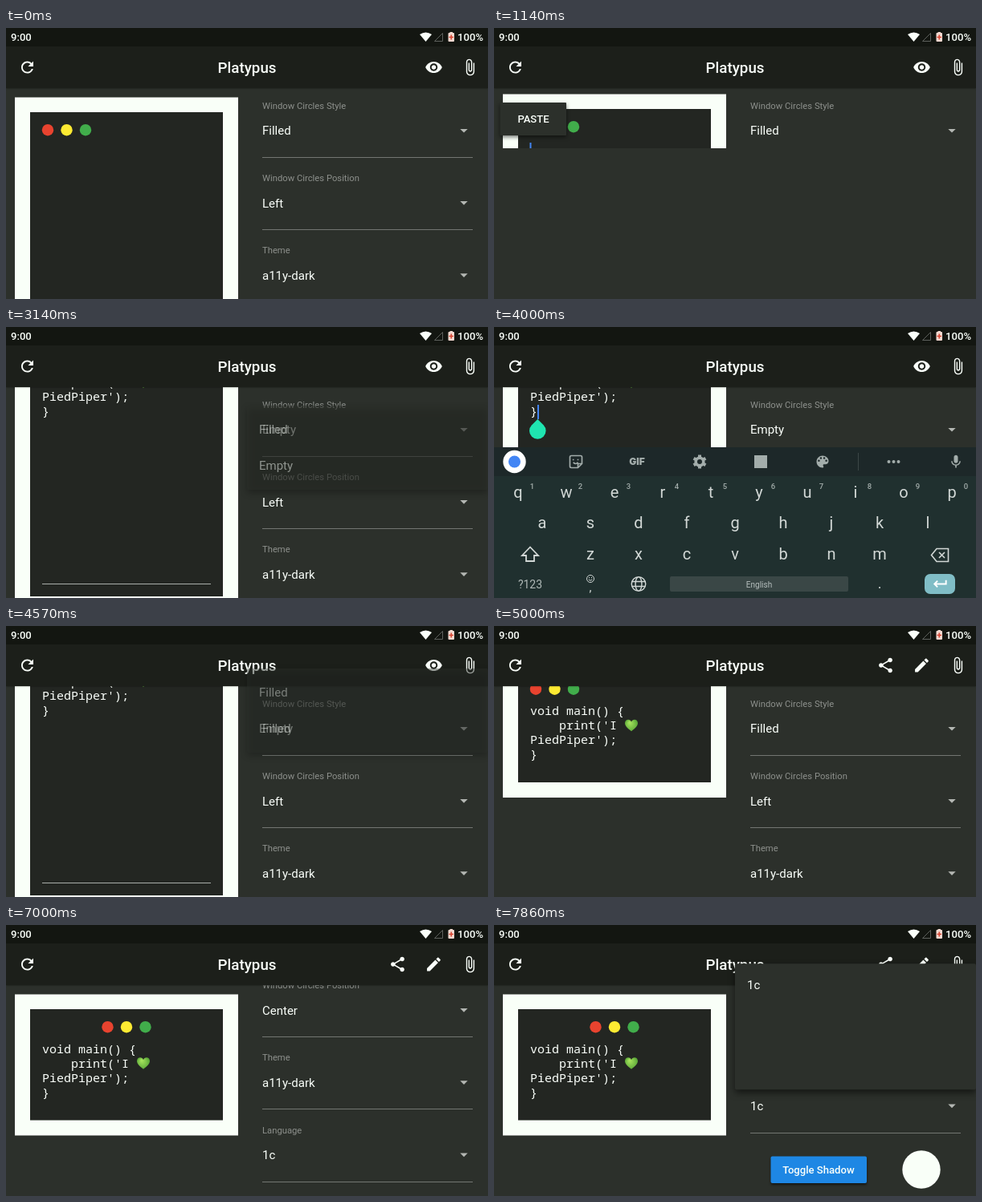
Recreate the animation shown at these times as an HTML page with a canvas. Size 600 by 338 pixels, loop 8000 ms.

```html
<!DOCTYPE html>
<html lang="en">
<head>
<meta charset="utf-8">
<title>Code snippet editor</title>
<style>
html, body { margin: 0; width: 100%; height: 100%; overflow: hidden; background: #2c302b; }
canvas { display: block; width: 600px; height: 338px; }
</style>
</head>
<body>
<canvas id="stage" width="600" height="338"></canvas>
<script>
const c = document.getElementById('stage').getContext('2d');
const LOOP = 8000, FPS = 7;
const BODY = '#2c302b', BAR = '#1c1f1a', WINDOW = '#232622', PAPER = '#f9fff8', TEXT = '#fafffa';
const ROBOTO = 'Roboto, sans-serif', MONO = '"Noto Sans Mono", "DejaVu Sans Mono", monospace';

// 24-unit icon outlines
const ICON = {
  refresh: 'M17.65 6.35C16.2 4.9 14.21 4 12 4c-4.42 0-7.99 3.58-7.99 8s3.57 8 7.99 8c3.73 0 6.84-2.55 7.73-6h-2.08c-.82 2.33-3.04 4-5.65 4-3.31 0-6-2.69-6-6s2.69-6 6-6c1.66 0 3.14.69 4.22 1.78L13 11h7V4z',
  eye: 'M12 4.5C7 4.5 2.73 7.61 1 12c1.73 4.39 6 7.5 11 7.5s9.27-3.11 11-7.5c-1.73-4.39-6-7.5-11-7.5zM12 17c-2.76 0-5-2.24-5-5s2.24-5 5-5 5 2.24 5 5-2.24 5-5 5zm0-8c-1.66 0-3 1.34-3 3s1.34 3 3 3 3-1.34 3-3-1.34-3-3-3z',
  clip: 'M16.5 6v11.5c0 2.21-1.79 4-4 4s-4-1.79-4-4V5c0-1.38 1.12-2.5 2.5-2.5s2.5 1.12 2.5 2.5v10.5c0 .55-.45 1-1 1s-1-.45-1-1V6H10v9.5c0 1.38 1.12 2.5 2.5 2.5s2.5-1.12 2.5-2.5V5c0-2.21-1.79-4-4-4S7 2.79 7 5v12.5c0 3.04 2.46 5.5 5.5 5.5s5.5-2.46 5.5-5.5V6z',
  share: 'M18 16.08c-.76 0-1.44.3-1.96.77L8.91 12.7c.05-.23.09-.46.09-.7s-.04-.47-.09-.7l7.05-4.11c.54.5 1.25.81 2.04.81 1.66 0 3-1.34 3-3s-1.34-3-3-3-3 1.34-3 3c0 .24.04.47.09.7L8.04 9.81C7.5 9.31 6.79 9 6 9c-1.66 0-3 1.34-3 3s1.34 3 3 3c.79 0 1.5-.31 2.04-.81l7.12 4.16c-.05.21-.08.43-.08.65 0 1.61 1.31 2.92 2.92 2.92s2.92-1.31 2.92-2.92-1.31-2.92-2.92-2.92z',
  edit: 'M3 17.25V21h3.75L17.81 9.94l-3.75-3.75zM20.71 7.04c.39-.39.39-1.02 0-1.41l-2.34-2.34c-.39-.39-1.02-.39-1.41 0l-1.83 1.83 3.75 3.75z',
  arrow: 'M6.4 9.5l5.6 5.6 5.6-5.6z',
  mic: 'M12 14c1.66 0 3-1.34 3-3V5c0-1.66-1.34-3-3-3S9 3.34 9 5v6c0 1.66 1.34 3 3 3zm5.3-3c0 3-2.54 5.1-5.3 5.1S6.7 14 6.7 11H5c0 3.41 2.72 6.23 6 6.72V21h2v-3.28c3.28-.48 6-3.3 6-6.72z',
  palette: 'M12 3c-4.97 0-9 4.03-9 9s4.03 9 9 9c.83 0 1.5-.67 1.5-1.5 0-.39-.15-.74-.39-1.01-.23-.26-.38-.61-.38-.99 0-.83.67-1.5 1.5-1.5H16c2.76 0 5-2.24 5-5 0-4.42-4.03-8-9-8zM6.5 12a1.5 1.5 0 1 1 0-3 1.5 1.5 0 0 1 0 3zm3-4a1.5 1.5 0 1 1 0-3 1.5 1.5 0 0 1 0 3zm5 0a1.5 1.5 0 1 1 0-3 1.5 1.5 0 0 1 0 3zm3 4a1.5 1.5 0 1 1 0-3 1.5 1.5 0 0 1 0 3z',
  shift: 'M12 2.5L2 13h5v7h10v-7h5z',
  erase: 'M8 4H22.5V20H8L1.5 12zM11 8.5l7 7M18 8.5l-7 7',
  enter: 'M20 7v5H5M9 8l-4 4 4 4',
  globe: 'M2 12a10 10 0 1 0 20 0 10 10 0 1 0-20 0zM7.5 12a4.5 10 0 1 0 9 0 4.5 10 0 1 0-9 0zM3 8.5h18M3 15.5h18',
  sticker: 'M5 3h14a2 2 0 0 1 2 2v10l-6 6H5a2 2 0 0 1-2-2V5a2 2 0 0 1 2-2zM15 21v-6h6M8 8v2M15 8v2M8 13q4 4 7 0',
  smile: 'M3 12a9 9 0 1 0 18 0 9 9 0 1 0-18 0zM9 8v2.5M15 8v2.5M7.5 14q4.5 5 9 0',
  heart: 'M12 22C5 17 1 13 1 8c0-7 9-8 11-2 2-6 11-5 11 2 0 5-4 9-11 14z',
  drop: 'M12 0L20.500 8.500A12 12 0 1 1 3.500 8.500z'
};
for (const name in ICON) ICON[name] = new Path2D(ICON[name]);

const clamp = v => Math.max(0, Math.min(1, v));

// Latest value whose step has been reached
const at = (n, ...steps) => steps.reduce((v, [from, to]) => n >= from ? to : v, 0);

function rect(x, y, w, h, fill) {
  c.fillStyle = fill;
  c.fillRect(x, y, w, h);
}

function round(x, y, w, h, r, fill) {
  c.fillStyle = fill;
  c.beginPath();
  c.roundRect(x, y, w, h, r);
  c.fill();
}

function disc(x, y, r, fill) {
  c.fillStyle = fill;
  c.beginPath();
  c.arc(x, y, r, 0, 7);
  c.fill();
}

function text(s, x, y, size, fill = TEXT, align = 'left', weight = 400, family = ROBOTO) {
  c.font = `${weight} ${size}px ${family}`;
  c.textAlign = align;
  c.fillStyle = fill;
  c.fillText(s, x, y);
}

function icon(name, x, y, size, color = TEXT, line = 0) {
  c.save();
  c.translate(x - size / 2, y - size / 2);
  c.scale(size / 24, size / 24);
  c.fillStyle = c.strokeStyle = color;
  c.lineWidth = line;
  if (line) c.stroke(ICON[name]); else c.fill(ICON[name], 'evenodd');
  c.restore();
}

function shadow(blur, y, draw) {
  c.save();
  c.shadowColor = 'rgba(0,0,0,.55)';
  c.shadowBlur = blur;
  c.shadowOffsetY = y;
  draw();
  c.restore();
}

function clipped(top, bottom, draw) {
  c.save();
  c.beginPath();
  c.rect(0, top, 600, bottom - top);
  c.clip();
  draw();
  c.restore();
}

function header(preview) {
  shadow(2, 0, () => rect(0, 0, 600, 75, BAR));
  rect(0, 0, 600, 23, '#131611');
  text('9:00', 6, 16, 13.1, TEXT, 'left', 500);
  text('100%', 594, 16, 13.1, TEXT, 'right', 500);
  c.fillStyle = TEXT;
  c.beginPath();
  c.moveTo(522.5, 17);
  c.lineTo(515, 8);
  c.quadraticCurveTo(522.5, 3, 530, 8);
  c.fill();
  c.strokeStyle = '#5d605c';
  c.lineWidth = 1;
  c.beginPath();
  c.moveTo(533.5, 16.5);
  c.lineTo(543.5, 16.5);
  c.lineTo(543.5, 6.5);
  c.closePath();
  c.stroke();
  rect(552.5, 5, 3.5, 2, '#f3d9d0');
  round(550.5, 6, 7.5, 11, 1, '#f3d9d0');
  rect(553.5, 8.5, 1.5, 6, '#d8432f');
  rect(551.5, 10.7, 5.5, 1.5, '#d8432f');

  icon('refresh', 26.5, 49, 22.5);
  text('Platypus', 300, 55.7, 18.75, TEXT, 'center', 500);
  if (preview) icon('share', 487.5, 49, 22.5);
  icon(preview ? 'edit' : 'eye', 532.5, 49, 22.5);
  icon('clip', 577.5, 49, 22.5);
}

function heart(x, y) {
  const g = c.createRadialGradient(9, 7, 1, 12, 12, 13);
  g.addColorStop(0, '#a5e25c');
  g.addColorStop(1, '#4f9f33');
  icon('heart', x, y, 17.5, g);
}

function card(s) {
  const bottom = s.preview ? 243.5 : 440;
  c.save();
  c.translate(0, -s.scroll);
  rect(11, 86.5, 278, bottom - 67.5, PAPER);
  rect(30, 105, 240, bottom - 105, WINDOW);
  ['#e8432f', '#fdea32', '#41ad4b'].forEach((color, i) => {
    const x = (s.position === 'Center' ? 126.5 : 52) + 23.5 * i;
    if (s.style === 'Filled') return disc(x, 127.2, 7.2, color);
    c.strokeStyle = color;
    c.lineWidth = 1.5;
    c.beginPath();
    c.arc(x, 127.2, 6.5, 0, 7);
    c.stroke();
  });
  if (s.code) {
    ['void main() {', "    print('I ", "PiedPiper');", '}'].forEach((line, i) =>
      text(line, 45, 159.5 + 18 * i, 15, TEXT, 'left', 400, MONO));
    heart(171, 172.5);
  }
  if (!s.preview) rect(45, 424, 210, 1, '#a9ada9');
  if (s.focus) {
    rect(s.code ? 54 : 44.5, s.code ? 201 : 147, 2, 18, '#4285f4');
    if (s.handle) icon('drop', 54.3, 229.3, 20.5, '#1fe5b0');
  }
  c.restore();
}

function options(s) {
  c.save();
  c.translate(0, -s.side);
  [['Window Circles Style', s.style], ['Window Circles Position', s.position],
   ['Theme', 'a11y-dark'], ['Language', '1c']].forEach(([label, value], i) => {
    const y = 90.2 * i;
    text(label, 319, 101 + y, 11.25, '#8d908c');
    text(value, 319, 133.3 + y, 15);
    icon('arrow', 570, 128 + y, 20, '#b4b7b3');
    rect(319, Math.round(161 + y), 262, 1, '#737672');
  });
  shadow(3, 2, () => round(344.5, 461.5, 119.5, 33.5, 2, '#1e87e4'));
  text('Toggle Shadow', 404, 482.8, 13.1, TEXT, 'center', 500);
  disc(532, 478, 23.7, PAPER);
  c.restore();
}

// Drop-down list: fades in, grows from the chosen row, then shows the other rows
function menu({ items, top, sel = 0, height = 45 * items.length + 15, open = 1, alpha = 1 }) {
  const grow = clamp((open - .25) * 4);
  const row = top + 7.5 + 45 * sel;
  const y1 = row + (top - row) * grow;
  const y2 = row + 45 + (top + height - row - 45) * grow;
  c.save();
  c.globalAlpha = alpha * clamp(open * 4);
  shadow(9, 4, () => round(300, y1, 300, y2 - y1, 2, BODY));
  items.forEach((item, i) => {
    c.globalAlpha = alpha * (i === sel ? 1 : clamp((open - .5) * 3));
    text(item, 315, top + 35.3 + 45 * i, 15);
  });
  c.restore();
}

function pasteBar(y) {
  shadow(5, 2, () => round(7.5, y, 82.5, 41, 1, BODY));
  text('PASTE', 49, y + 25, 13.1, TEXT, 'center', 500);
}

function gear(x, y, color) {
  c.save();
  c.translate(x, y);
  c.fillStyle = c.strokeStyle = color;
  for (let i = 0; i < 6; i++) {
    c.rotate(Math.PI / 3);
    c.fillRect(-2, -8.5, 4, 5);
  }
  c.lineWidth = 3.6;
  c.beginPath();
  c.arc(0, 0, 4.8, 0, 7);
  c.stroke();
  c.restore();
}

function keyboard(up) {
  const key = '#d2d8d6', grey = '#a3adab';
  c.save();
  c.translate(0, 188 * (1 - up));
  rect(0, 150, 600, 188, '#20302f');
  rect(0, 150, 600, 36, '#1d2829');
  disc(25.5, 168, 14.2, '#fff');
  disc(25.5, 168, 7.5, '#4285f4');
  icon('sticker', 102, 168, 20, grey, 2);
  text('GIF', 178, 172.3, 12, grey, 'center', 900, 'Inter, sans-serif');
  gear(256, 168, grey);
  rect(324, 160, 16, 16, grey);
  icon('palette', 409, 168, 20, grey);
  rect(453, 157, 1, 22, '#3c4746');
  for (let i = -1; i < 2; i++) disc(497.5 + 6 * i, 168, 2, grey);
  icon('mic', 575, 168, 20, grey);

  [['qwertyuiop', 30, 213], ['asdfghjkl', 60, 250.5], ['zxcvbnm', 120, 289.5]].forEach(([row, x, y], r) =>
    [...row].forEach((letter, i) => {
      text(letter, x + 60 * i, y, 20, key, 'center');
      if (!r) text((i + 1) % 10, x + 17.5 + 60 * i, 201.5, 9.5, grey, 'center', 500);
    }));
  icon('shift', 45, 284, 24, key, 1.8);
  icon('erase', 555, 284.5, 24, key, 1.6);
  text('?123', 45, 325.5, 14, '#b0b9b7', 'center');
  icon('smile', 120, 314, 12, key, 2);
  text(',', 120, 330, 15, key, 'center');
  icon('globe', 180, 320.5, 21, key, 1.6);
  round(219, 311, 222, 19, 2, '#3a4746');
  text('English', 330, 324.5, 10, '#b5bebd', 'center');
  text('.', 480, 326, 18, key, 'center');
  round(536, 308, 38, 25, 7, '#80bdc6');
  icon('enter', 555, 320.5, 23, '#fff', 2);
  c.restore();
}

function render(n) {
  const focus = (n >= 8 && n < 16) || (n >= 23 && n < 30);
  const s = {
    focus,
    preview: n >= 34,
    code: n >= 11,
    handle: n >= 12,
    style: n >= 22 && n < 32 ? 'Empty' : 'Filled',
    position: n >= 44 ? 'Center' : 'Left',
    scroll: at(n, [8, 4], [9, 32], [10, 49], [12, 84], [13, 104], [35, 48.5], [36, 18], [37, 5], [38, 0]),
    side: at(n, [48, 42], [49, 112], [50, 156], [51, 173])
  };
  const up = at(n, [9, .6], [10, 1], [15, .4], [16, 0], [23, .6], [24, 1], [29, .5], [30, 0]);

  rect(0, 0, 600, 338, BODY);
  clipped(75, focus ? 150 : 338, () => {
    card(s);
    options(s);
  });
  header(s.preview);
  if (n >= 7 && n < 11) pasteBar(97 - s.scroll);
  if (up) keyboard(up);

  const styles = ['Filled', 'Empty'], places = ['Left', 'Center', 'Right'];
  if (n >= 17 && n < 23)
    menu({ items: styles, top: 98, open: at(n, [17, .4], [18, .85], [19, 1]), alpha: n === 22 ? .5 : 1 });
  if (n >= 29 && n < 33)
    menu({ items: styles, top: 53, sel: 1, open: n === 29 ? .45 : 1, alpha: n === 32 ? .4 : 1 });
  if (n >= 39 && n < 45)
    menu({ items: places, top: 142.5, open: n === 39 ? .5 : 1, alpha: n === 44 ? .5 : 1 });
  if (n >= 55)
    menu({ items: ['1c'], top: 45, height: 247.5, open: .388 });
}

function tick(now) {
  render(Math.floor((now % LOOP) * FPS / 1000 + .1) % (LOOP * FPS / 1000));
  requestAnimationFrame(tick);
}
requestAnimationFrame(tick);
</script>
</body>
</html>
```
